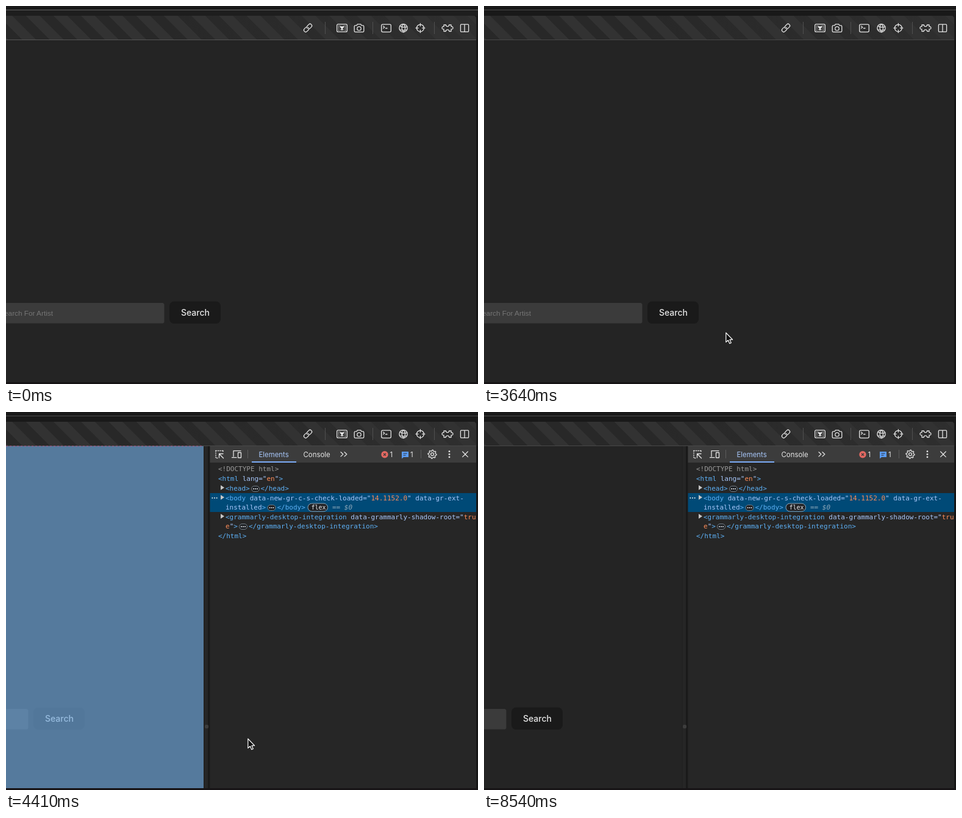
Animation, 774 px wide and 620 px high, one loop 9.17 s. Source, as an HTML page:

```html
<!DOCTYPE html>
<html lang="en">
<head>
<meta charset="utf-8">
<title>Inspecting a page</title>
<style>
  html, body { margin: 0; width: 100%; height: 100%; overflow: hidden; background: #1a1a1a; }
  svg { display: block; width: 774px; height: 620px; }
  text { white-space: pre; }
  .ui { font-family: Inter, sans-serif; fill: #e6e6e6; }
  .menu { font-size: 12.6px; }
  .tabs { font-size: 11.4px; }
  .code { font: 11px "DejaVu Sans Mono", monospace; fill: #5db0f5; }
  .name { fill: #a8c7fa; }
  .value { fill: #fe8d59; }
  .dim { fill: #9a9a9a; }
  .line { fill: none; stroke: #e4e4e4; stroke-width: 1.3; stroke-linecap: round; stroke-linejoin: round; }
</style>
</head>
<body>
<svg viewBox="0 0 774 620">
  <defs>
    <pattern id="stripes" width="45.25" height="60" patternUnits="userSpaceOnUse" patternTransform="translate(-6 0) skewX(45)">
      <rect width="22.6" height="60" fill="#282828"/>
    </pattern>
    <linearGradient id="fade"><stop offset=".35" stop-color="#323232" stop-opacity="0"/><stop offset="1" stop-color="#323232" stop-opacity=".65"/></linearGradient>
    <clipPath id="pageClip"><rect id="pageBox" y="56" width="771" height="561"/></clipPath>
    <filter id="shadow" x="-20%" y="-10%" width="140%" height="125%"><feDropShadow dx="0" dy="4" stdDeviation="3" flood-opacity=".45"/></filter>
  </defs>

  <rect width="774" height="620" fill="#191919"/>
  <rect id="topGap" y="7" width="774" height="9" fill="#1e1e1e"/>
  <rect id="topLine" y="6" width="774" height="1"/>
  <path d="M0 16H766Q771 16 771 21V55H0Z" fill="#323232"/>
  <path d="M0 16H766Q771 16 771 21V55H0Z" fill="url(#stripes)"/>
  <path d="M0 16H766Q771 16 771 21V55H0Z" fill="url(#fade)"/>
  <rect id="headLine" y="55" width="771" height="1"/>
  <path d="M523.5 26V46M601.5 26V46M702.5 26V46" stroke="#505050"/>

  <g class="line">
    <g transform="translate(495 36) rotate(-45)">
      <path d="M-1 -3H-5A3 3 0 0 0 -5 3H-2A3 3 0 0 0 1 0M1 3H5A3 3 0 0 0 5 -3H2A3 3 0 0 0 -1 0"/>
    </g>
    <rect x="542.7" y="29.8" width="16.6" height="12.6" rx="2"/>
    <path d="M545.5 33H546M545.5 36H546M545.5 39.5H546M556 33H556.5M556 36H556.5M556 39.5H556.5M548 33L551 35L554 33M549 39H553M551 34V38"/>
    <path d="M548.5 34.5L551 37.5L553.5 34.5Z" fill="#e4e4e4"/>
    <path d="M573 31.8H575L576.3 29.8H581.7L583 31.8H585Q586.8 31.8 586.8 33.5V41Q586.8 42.7 585 42.7H573Q571.2 42.7 571.2 41V33.5Q571.2 31.8 573 31.8Z"/>
    <circle cx="579" cy="37" r="3.2"/>
    <rect x="615.7" y="30.2" width="15.6" height="12.4" rx="2"/>
    <path d="M618.7 33L620.7 34.7L618.7 36.4M622.5 36.5H625"/>
    <circle cx="651.5" cy="36.2" r="6.6"/>
    <path d="M646 33Q652 36 658 34M645.5 38.5Q651 41 657 39M651 29.7Q647 36 651.5 42.7M652 29.7Q657 36 652.5 42.7"/>
    <circle cx="679.4" cy="36.2" r="5.9"/>
    <path d="M679.4 28.7V33M679.4 39.4V43.7M671.9 36.2H676.2M682.6 36.2H686.9"/>
    <path d="M718 31H721.5C721 34.5 727 34.5 726.5 31H730V33.8C734 32.8 734 39 730 38V41.5H726.7C727 38 721 38 721.3 41.5H718V38C714 39 714 32.8 718 33.8Z"/>
    <path d="M746.5 30.2H757.5Q758.6 30.2 758.6 31.5V41Q758.6 42.3 757.5 42.3H746.5Q745.4 42.3 745.4 41V31.5Q745.4 30.2 746.5 30.2ZM752 30.2V42.3"/>
  </g>

  <rect y="56" width="771" height="561" fill="#242424"/>
  <g clip-path="url(#pageClip)">
    <g id="page">
      <rect x="-60" y="487" width="319.5" height="33.5" rx="3.5" fill="#3b3b3b"/>
      <text x="77" y="507.5" text-anchor="end" font-family="Liberation Sans, Arial, sans-serif" font-size="11.8" fill="#757575">Search For Artist</text>
      <rect x="268" y="484.5" width="84" height="36.5" rx="7.5" fill="#1a1a1a"/>
      <text class="ui" x="310.4" y="507.6" text-anchor="middle" font-size="14" font-weight="500">Search</text>
    </g>
  </g>
  <g id="overlay">
    <rect y="56" width="324" height="563" fill="#6fa8dc" fill-opacity=".66"/>
    <path id="ruler" d="M0 56H324" stroke="#b0568c" stroke-dasharray="3 3"/>
  </g>

  <g id="devtools">
    <rect x="324" y="56" width="447" height="561" fill="#262626"/>
    <path d="M325 56V617" stroke="#1c1c1c"/>
    <rect x="331" y="56" width="3.5" height="561" fill="#1a1a1a"/>
    <rect x="326" y="513" width="6" height="6" rx="2" fill="#3d3d3d"/>
    <g id="toolbar">
      <rect x="334.5" y="56" width="436.5" height="27" fill="#3c3c3c"/>
      <rect id="moreHover" x="543" y="56" width="21" height="26" fill="#505050"/>
      <rect id="consoleHover" x="476" y="56" width="68" height="26" fill="#505050"/>
      <rect x="403" y="81" width="73" height="2" fill="#7cacf8"/>
      <path d="M396.5 62V76M680.5 62V76" stroke="#5c5c5c"/>
      <g class="ui tabs">
        <text x="414.5" y="73.5" style="fill:#a8c7fa">Elements</text>
        <text x="487.5" y="73.5">Console</text>
        <text x="629.5" y="74">1</text>
        <text x="663" y="74">1</text>
      </g>
      <g class="line">
        <path d="M344 63.5H356" stroke-dasharray="1.2 2.2"/>
        <path d="M344 63.5V75.5H348M356 63.5V66" stroke-dasharray="1.2 2.2"/>
        <path d="M349.5 75V68.5H356M350 69L356.5 75.7"/>
        <path d="M385 63.7H373V73M370.5 74.7H378"/>
        <rect x="380.5" y="66.5" width="5" height="8.5" rx=".6"/>
        <path d="M549 65.7L552.8 69.3L549 72.9M555 65.7L558.8 69.3L555 72.9M748.7 65L757.3 73.6M757.3 65L748.7 73.6"/>
        <path id="gear"/>
        <circle cx="699" cy="69.3" r="2.4"/>
      </g>
      <g fill="#e4e4e4"><circle cx="727" cy="64.7" r="1.4"/><circle cx="727" cy="69.3" r="1.4"/><circle cx="727" cy="73.9" r="1.4"/></g>
      <circle cx="621" cy="69.7" r="5.7" fill="#e46962"/>
      <path d="M619 67.7L623 71.7M623 67.7L619 71.7" stroke="#3c3c3c" stroke-width="1.3"/>
      <path d="M649 65H660V74H652L649 76.5Z" fill="#5b9df5"/>
      <path d="M651.5 68H657.5M651.5 71H655.5" stroke="#303030" stroke-width="1.2"/>
    </g>
    <g id="tree">
      <rect id="rowHover" x="337" y="85.5" width="431" height="15.5" rx="4" fill="#34393f"/>
      <rect x="334.5" y="133" width="436.5" height="31" fill="#004a77"/>
      <g class="code" id="code"></g>
      <rect x="495" y="150" width="32.5" height="13" rx="6.5" fill="#202124" stroke="#8fa9bd"/>
      <text class="code" x="500.5" y="160" style="fill:#e8eaed;font-size:10px" textLength="0">flex</text>
      <text class="code" x="535" y="160" font-style="italic" style="fill:#8ba6b8;font-style:italic">== $0</text>
    </g>
  </g>
  <rect id="blank" y="56" width="773" height="561"/>
  <rect x="771" y="56" width="3" height="564" fill="#151515"/>
  <rect id="bottomEdge" y="617" width="774" height="3" fill="#171416"/>

  <g id="menu">
    <rect x="315.5" y="289.5" width="146" height="262" rx="5.5" fill="#292929" stroke="#585858" filter="url(#shadow)"/>
    <rect id="inspectHover" x="320.5" y="525.5" width="137" height="22" rx="4" fill="#3565c4"/>
    <path d="M329 365.5H448M329 464.5H448M329 497.5H448" stroke="#5a5a5a"/>
    <circle cx="337" cy="481.5" r="7.2" fill="#8c1512"/>
    <g class="ui menu" id="items"></g>
  </g>
  <path id="cursor" d="M0 0V15.3L3.5 12.1L5.9 17.6L8.5 16.5L6.2 11.2H10.8Z" fill="#111" stroke="#fff" stroke-width="1.2" stroke-linejoin="round"/>
</svg>
<script>
const el = id => document.getElementById(id);
const LOOP = 9170;

el('items').innerHTML = [
  ['Back', 305], ['Forward', 327], ['Reload', 349], ['Save As...', 382], ['Print...', 404], ['Cast...', 426],
  ['Translate to English', 448], ['Block element...', 481], ['View Page Source', 514], ['Inspect', 536]
].map(([label, y], i) =>
  `<text x="${i === 7 ? 351 : 329}" y="${y + 4.8}"${i < 2 ? ' style="fill:#737373"' : ''}>${label}</text>`).join('');

// Markup row: {attribute}, [value], everything else is tag colour.
const row = (x, y, source) => `<text x="${x}" y="${y}">` + source
  .replace(/</g, '&lt;').replace(/>/g, '&gt;')
  .replace(/\{(.*?)\}/g, '<tspan class="name">$1</tspan>')
  .replace(/\[(.*?)\]/g, '<tspan class="value">$1</tspan>') + '</text>';
const dots = (x, y, gap) => [-1, 0, 1].map(i => `<circle cx="${x + i * gap}" cy="${y}" r="1" fill="#e8eaed"/>`).join('');
const badge = (x, y) => `<rect x="${x - 6.5}" y="${y - 4.5}" width="13" height="9" rx="4.5" fill="#1d2024" stroke="#8a949c" stroke-width=".8"/>` + dots(x, y, 3);
const arrow = y => `<path d="M352 ${y - 4}L358 ${y}L352 ${y + 4}Z" fill="#c7c7c7"/>`;

el('code').innerHTML =
  '<text class="dim" x="348" y="97">&lt;!DOCTYPE html&gt;</text>' +
  row(348, 113, '<html {lang="}[en]{"}>') +
  arrow(124) + row(360, 129, '<head>') + badge(409, 126) + row(417.5, 129, '</head>') +
  dots(342, 141, 3.6) + arrow(140) +
  row(360, 145, '<body {data-new-gr-c-s-check-loaded="}[14.1152.0]{" data-gr-ext-}') +
  row(360, 160, '{installed}>') + badge(435.5, 157) + row(444.5, 160, '</body>') +
  arrow(171) + row(360, 176, '<grammarly-desktop-integration {data-grammarly-shadow-root="}[tru]') +
  row(360, 191, '[e]{"}>') + badge(389, 188) + row(398, 191, '</grammarly-desktop-integration>') +
  row(348, 207, '</html>');
document.querySelector('[textLength]').removeAttribute('textLength');

el('gear').setAttribute('d', 'M' + Array.from({ length: 32 }, (_, i) => {
  const a = i * Math.PI / 16, r = i % 4 < 2 ? 7 : 5.3;
  return `${(699 + r * Math.cos(a)).toFixed(1)} ${(69.3 + r * Math.sin(a)).toFixed(1)}`;
}).join('L') + 'Z');

const within = (t, from, to) => t >= from && t < to;
const show = (id, on) => el(id).style.display = on ? '' : 'none';

// [from, to, x, y]; the pointer is hidden while it travels.
const cursorStops = [
  [1330, 2100, 312.8, 292], [2100, 2170, 316, 292],
  [3290, 4970, 396.8, 536], [6510, 8470, 506.8, 70]
];

function draw(t) {
  const early = t < 770, docked = t >= 4200;
  el('topLine').setAttribute('fill', early ? '#626262' : '#4c4c4c');
  el('headLine').setAttribute('fill', early ? '#565656' : '#484848');
  el('topGap').setAttribute('fill', early ? '#1e1e1e' : '#191919');

  el('page').setAttribute('transform', `translate(${docked ? -223 : 0} 0)`);
  el('pageBox').setAttribute('width', docked ? 324 : 771);
  show('blank', within(t, 4130, 4200));
  show('devtools', docked);
  show('toolbar', t >= 4270);
  show('tree', t >= 4340);
  show('overlay', within(t, 4410, 5180));
  show('ruler', t < 4480);
  show('rowHover', within(t, 5250, 5320) || within(t, 8470, 8540));
  show('moreHover', within(t, 5530, 5600));
  show('consoleHover', within(t, 5600, 8470));

  show('menu', within(t, 1540, 3640));
  el('menu').style.opacity = t < 3430 ? 1 : 0.75 - 0.25 * Math.floor((t - 3430) / 70);
  show('inspectHover', t >= 2660 && !within(t, 3290, 3360));

  const stop = cursorStops.find(([from, to]) => within(t, from, to));
  show('cursor', stop);
  if (stop) el('cursor').setAttribute('transform', `translate(${stop[2]} ${stop[3]})`);
}

const start = performance.now();
function tick() {
  draw((performance.now() - start) % LOOP);
  requestAnimationFrame(tick);
}
draw(0);
tick();
</script>
</body>
</html>
```
